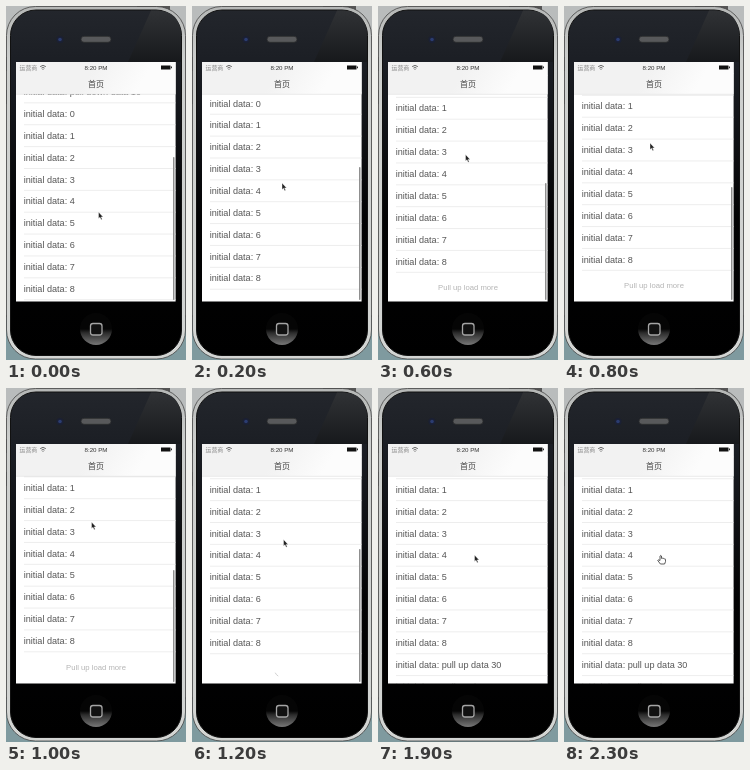
An HTML page that plays this animation: 180x354 px, repeating every 2400 ms.

```html
<!DOCTYPE html>
<html lang="en">
<head>
<meta charset="utf-8">
<title>Pull up to load more</title>
<style>
html, body { margin: 0; width: 100%; height: 100%; overflow: hidden; background: #b9bcbc; }
svg { display: block; width: 180px; height: 354px; }
text { font-family: "Liberation Sans", Arial, sans-serif; }
.cjk { font-family: "Noto Sans CJK SC", "Noto Sans CJK", sans-serif; }
#rows text { font-size: 9.1px; fill: #555; }
#rows path { stroke: #e6e6e6; stroke-width: .7; }
</style>
</head>
<body>
<svg viewBox="0 0 180 354">
  <defs>
    <linearGradient id="rim" x2="0" y2="1">
      <stop offset="0" stop-color="#b5b7b6"/><stop offset=".15" stop-color="#cdcfcd"/>
      <stop offset="1" stop-color="#d3d5d3"/>
    </linearGradient>
    <linearGradient id="glass" x2="0" y2="1">
      <stop offset="0" stop-color="#23262c"/><stop offset=".16" stop-color="#1b1e24"/>
      <stop offset=".6" stop-color="#030304"/><stop offset="1" stop-color="#000"/>
    </linearGradient>
    <linearGradient id="glare" x2="0" y2="1">
      <stop offset="0" stop-color="#303235"/><stop offset="1" stop-color="#17191c"/>
    </linearGradient>
    <linearGradient id="home" x2="0" y2="1">
      <stop offset=".5" stop-color="#050505"/><stop offset=".62" stop-color="#2c2c2c"/>
      <stop offset="1" stop-color="#777"/>
    </linearGradient>
    <linearGradient id="nav" x2="1" y2=".12">
      <stop offset=".5" stop-color="#f2f2f2"/><stop offset=".85" stop-color="#fcfcfc"/>
    </linearGradient>
    <clipPath id="screen"><path d="M10 56H169.600V295.500H10z"/></clipPath>
  </defs>

  <!-- desktop and phone body -->
  <path d="M0 310H180V354H0z" fill="#7f9a9f"/>
  <path d="M0 310H180" stroke="#222"/>
  <path d="M131 0h33v4h-33zM0 51h4v14H0zM0 84h4v14H0z" fill="#555"/>
  <rect x=".5" y=".5" width="179" height="352.500" rx="29" fill="url(#rim)" stroke="#444" stroke-width=".8"/>
  <rect x="4.500" y="4" width="171" height="345.500" rx="25.500" fill="url(#glass)" stroke="#111"/>
  <path d="M145 4.500H150Q175 4.500 175 30V56H122z" fill="url(#glare)"/>
  <circle cx="54" cy="33.500" r="3.600" fill="#1b2034"/>
  <circle cx="54" cy="33.500" r="1.800" fill="#2b3c70"/>
  <rect x="75" y="30.300" width="30" height="6" rx="3" fill="#58595b" stroke="#2b2c2e" stroke-width=".8"/>
  <circle cx="90" cy="323" r="16" fill="url(#home)"/>
  <rect x="84.500" y="317.500" width="11.500" height="11.500" rx="2.500" fill="#111" stroke="#a5a5a5" stroke-width="1.300"/>

  <g clip-path="url(#screen)">
    <path d="M10 56H170V296H10z" fill="#fff"/>
    <g id="rows"></g>
    <text id="hint" x="90" text-anchor="middle" font-size="7.700" fill="#b4b4b4">Pull up load more</text>
    <path id="ring" fill="none" stroke="#c4c4c4" stroke-width=".8"/>
    <rect id="bar" x="167" width="1.500" rx=".7" fill="#8f8f8f"/>

    <path d="M10 56H170V88H10z" fill="url(#nav)"/>
    <path d="M10 88.300H170" stroke="#dcdcdc" stroke-width=".6"/>
    <text class="cjk" x="13.500" y="63.900" font-size="5.900" fill="#888">运营商</text>
    <g fill="none" stroke="#555" stroke-width=".9">
      <path d="M34.200 60.600q2.800-2.400 5.600 0M35.500 62.100q1.500-1.200 3 0"/>
      <path d="M36.600 63.500h.8"/>
    </g>
    <text x="90" y="63.700" text-anchor="middle" font-size="6.200" fill="#333">8:20 PM</text>
    <path d="M155 59.500h9.500v3.900H155zM165 60.600h.9v1.700h-.9z" fill="#111"/>
    <text class="cjk" x="90" y="80.500" text-anchor="middle" font-size="8" fill="#444">首页</text>
  </g>

  <path id="arrow" d="M0 0V6.600L1.500 5.300 2.600 7.800 3.700 7.300 2.600 4.900H4.600z" fill="#222" stroke="#fff" stroke-width=".4"/>
  <path id="hand" d="M96 172.500V168q.8-1.100 1.500 0v2.400q.8-.7 1.500.2.8-.6 1.400.3 1-.4 1.100.6v2.100L100.600 176h-4.200L93.700 172.400q.6-1.100 2.300.1z" fill="#fff" stroke="#333" stroke-width=".8"/>
</svg>

<script>
const $ = id => document.getElementById(id);
const LOOP = 2400, STEP = 100, PITCH = 21.87;
const LOAD = 1200, DONE = 1800, HAND = 2300;

// [time, value] pairs joined by straight lines
const listY = [[0, 107.8], [200, 97.3], [400, 88.8], [600, 80.4], [800, 78.4], [1000, 77.9], [1100, 77.9], [1200, 79.8]];
const barTop = [[0, 151], [200, 161], [400, 170], [600, 177], [800, 181], [1000, 182], [1100, 182], [1200, 161]];
const mouseX = [[0, 92.5], [200, 90], [400, 89], [800, 86], [1000, 85.5], [1100, 85.5], [1200, 91.5], [1600, 96.5]];
const mouseY = [[0, 206], [200, 177], [400, 160], [800, 137], [1000, 134], [1100, 134], [1200, 151.5], [1600, 167]];

function at(keys, t) {
  const i = keys.findIndex(k => k[0] > t);
  if (i < 0) return keys[keys.length - 1][1];
  const [t0, a] = keys[i - 1], [t1, b] = keys[i];
  return a + (b - a) * (t - t0) / (t1 - t0);
}

function addRow(n) {
  const label = n < 0 ? "pull down data 10" : n > 8 ? "pull up data " + (21 + n) : n;
  const y = n * PITCH;
  $("rows").innerHTML += `<g><text x="17.7" y="${y + 3.2}">initial data: ${label}</text>
    <path d="M18 ${y + PITCH / 2}H170"/></g>`;
}
for (let n = -1; n <= 10; n++) addRow(n);
const extra = [...$("rows").children].slice(-2);

function arc(cx, cy, r, from, sweep) {
  const point = deg => {
    const a = deg * Math.PI / 180;
    return `${cx + r * Math.cos(a)} ${cy + r * Math.sin(a)}`;
  };
  return `M${point(from)}A${r} ${r} 0 ${sweep > 180 ? 1 : 0} 1 ${point(from + sweep)}`;
}

const show = (el, on) => el.setAttribute("visibility", on ? "visible" : "hidden");

function draw(now) {
  const t = Math.floor(now % LOOP / STEP) * STEP;
  const y = at(listY, t), top = at(barTop, t);
  const footer = y + 8 * PITCH + 26.8;
  const spin = t - LOAD;

  $("rows").setAttribute("transform", `translate(0 ${y})`);
  extra.forEach(row => show(row, t >= DONE));

  $("hint").setAttribute("y", footer + 2.2);
  show($("hint"), t < LOAD);
  $("ring").setAttribute("d", arc(90, footer, 7.5, 120 + spin * .3, Math.min(335, 35 + spin * .75)));
  show($("ring"), t >= LOAD && t < DONE);

  $("bar").setAttribute("y", top);
  $("bar").setAttribute("height", 294 - top);
  $("bar").setAttribute("opacity", Math.max(0, Math.min(1, (1500 - t) / 300)));

  $("arrow").setAttribute("transform", `translate(${at(mouseX, t)} ${at(mouseY, t)})`);
  show($("arrow"), t < HAND);
  show($("hand"), t >= HAND);
}

function tick() {
  draw(performance.now() - start);
  requestAnimationFrame(tick);
}
const start = performance.now();
tick();
</script>
</body>
</html>
```
